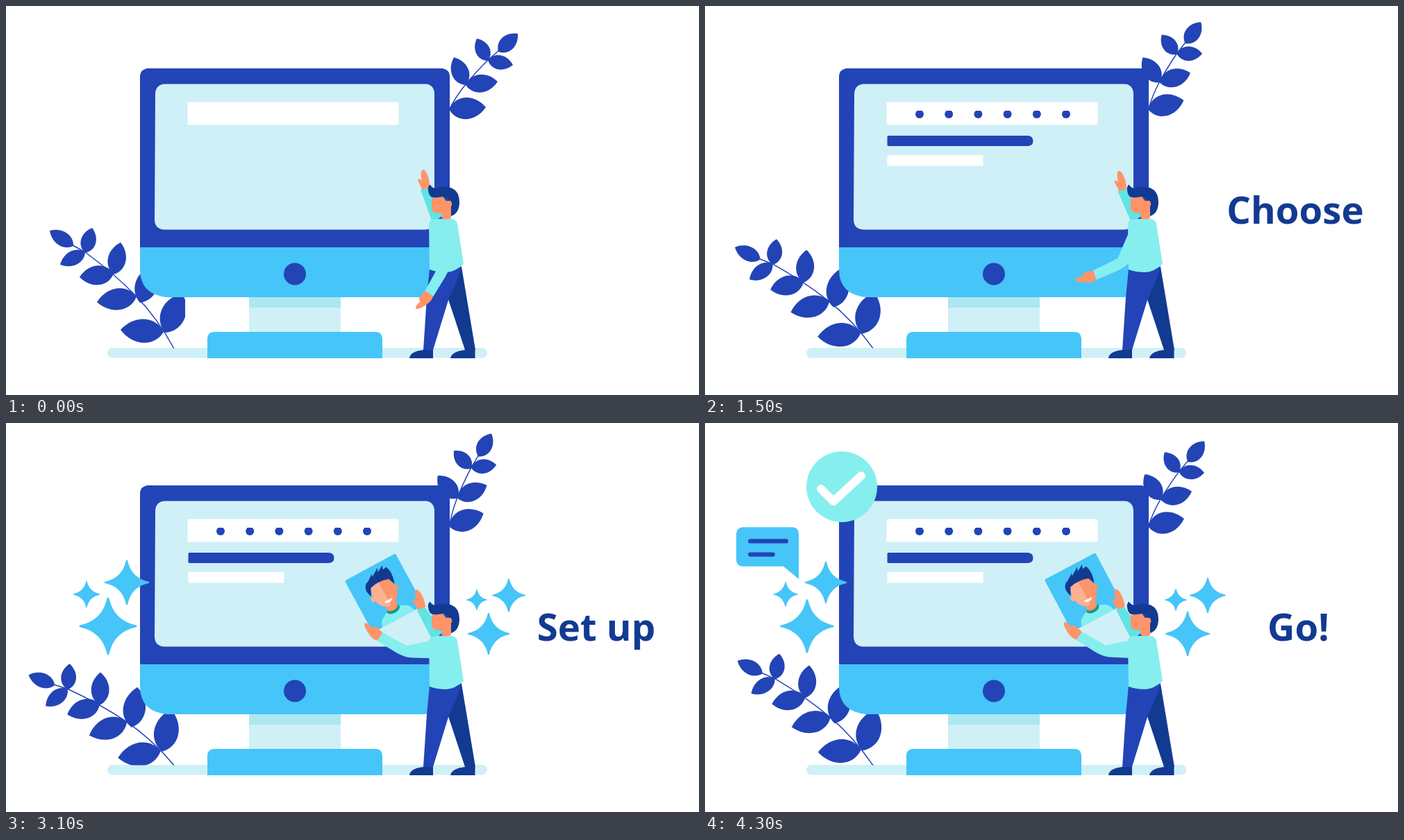
Animation of 998x561 px, one loop 4.4 s. Source, as an HTML page:

```html
<!DOCTYPE html>
<html lang="en">
<head>
<meta charset="utf-8">
<title>Profile setup</title>
<style>
  html, body { margin: 0; width: 100%; height: 100%; overflow: hidden; background: #fff; }
  svg { display: block; width: 100%; height: 100%; }
  .blue { fill: #2344b6; }
  .navy { fill: #123a91; }
  .sky { fill: #46c5f9; }
  .pale { fill: #cff0f7; }
  .mint { fill: #86eeef; }
  .teal { fill: #62e3e4; }
  .skin { fill: #ff9469; }
  .white { fill: #fff; }
  .stem { fill: none; stroke: #2344b6; stroke-width: 1.5; }
  .star { fill: #46c5f9; stroke: #46c5f9; stroke-width: .07; stroke-linejoin: round; }
  .line { fill: none; stroke-linecap: round; stroke-linejoin: round; }
  text { font: 600 54.5px "Noto Sans", "Open Sans", sans-serif; text-anchor: middle; fill: #123a91; }
</style>
</head>
<body>
<svg viewBox="0 0 998 561">
  <defs>
    <clipPath id="dotWipe"><rect id="dotMask" x="300" y="151" height="14"/></clipPath>
    <clipPath id="plantBox"><rect x="0" y="250" width="258" height="243.5"/></clipPath>
  </defs>

  <rect class="pale" x="146" y="493" width="547" height="14.5" rx="7.2"/>
  <g clip-path="url(#plantBox)">
    <g id="leftPlant"><path class="stem" d="M242 494Q218 450 187 418T114 355L96 345"/></g>
  </g>

  <g id="monitor">
    <path class="sky" d="M193 347H639V380Q639 420 600 420H232Q193 416 193 380Z"/>
    <path class="blue" d="M193 348V100Q194 92 203 90H629Q638 92 639 100V348Z"/>
    <path class="pale" d="M215 126Q216 113 229 112.500H604Q616 113 617 126V309Q616 322 603 322.500H228Q215 322 214 309Z"/>
    <circle class="blue" cx="416" cy="386.500" r="16"/>
    <path class="pale" d="M350 420H482V470H350Z"/>
    <path fill="#ade7f0" d="M350 420H482V435H350Z"/>
    <path class="sky" d="M290 508V479Q291 470 300 470H532Q541 470 542 479V508Z"/>
    <rect class="white" x="261.500" y="138.500" width="304" height="33" rx="2"/>
    <g id="dots" class="blue" clip-path="url(#dotWipe)"></g>
    <path id="blueBar" class="blue"/>
    <rect id="whiteBar" class="white" x="262.500" y="215" height="15.500"/>
  </g>

  <g id="rightPlant"><path class="stem" d="M638 150Q648 130 662 113T694 78L710 64"/></g>

  <g id="reach">
    <g id="photo" transform="translate(500 209.300) rotate(-20.700)">
      <rect class="sky" width="83" height="85" rx="2"/>
      <path class="mint" d="M16 85C17 74 29 70 34 69H50C58 70 67 74 68 85Z"/>
      <ellipse cx="42" cy="69.500" rx="10" ry="5.500" fill="#159a8c"/>
      <path class="skin" d="M34 54H50V68Q42 74 34 68Z"/>
      <circle cx="24" cy="43" r="4.200" fill="#ffb08f"/>
      <circle class="skin" cx="60" cy="43" r="4.200"/>
      <path fill="#ffb08f" d="M25 24H42V63C34 63 25 56 25 46Z"/>
      <path class="skin" d="M42 24H59V46C59 56 50 63 42 63Z"/>
      <path class="navy" d="M23 38C17 26 23 18 29 17L39 10L38 14L50 6L48 12L58 6L56 12L62 11C66 20 64 30 61 38L57 28Q42 23 28 27Z"/>
      <path class="white" d="M36 54H49Q46 58 42 58T36 54Z"/>
    </g>
    <path class="teal" d="M597 265L609 262L630 302L614 312Z"/>
    <path class="skin" d="M599 265C597 259 593 253 593.500 250Q595 248 599 252C597 245 597 238 600 236C604 235 607 243 609 250L610.500 262Z"/>
  </g>

  <g id="person">
    <path class="navy" d="M636 392L656 376L676 496H661L635 417Z"/>
    <path class="blue" d="M610 379Q632 388 656 375Q655 385 638 421L615 496H601L606 420Z"/>
    <path class="navy" d="M581 508Q582 498 601 496H615V508ZM640 508Q642 498 661 496L675.500 495V508Z"/>
    <path class="mint" d="M609 313Q610 307 622 307H641Q648 307 650 314L659 372Q646 384 634 384Q620 384 610 380Z"/>
    <path class="navy" d="M608 266C607 262 610 257 611 258Q613 262 618 263C624 261 629 260 634 261C648 262 653 271 653 283C653 294 648 301 641 303L636 277L614 276Q609 274 608 266Z"/>
    <path class="skin" d="M613 277L630 275Q632 280 634 281H641V306Q634 309 627.500 306V298C620 300 613 298 613 290Z"/>
    <circle class="skin" cx="637.500" cy="285.500" r="4.800"/>
  </g>

  <g id="frontArm">
    <path class="mint" d="M545 291L578 315L625 311Q641 314 641 326Q640 338 629 340L584 333Q574 332 562 323L536 302Z"/>
    <path class="skin" d="M546 292L537 302C530 300 526 292 523 284C520 277 522 274 525 275.500C528 277 530 281 532 283C536 279 540 284 546 292Z"/>
  </g>

  <g id="stars"></g>

  <g id="bubble">
    <path class="sky" d="M50 147H126Q135 148 135 156V225L112 206H50Q42 205 41 197V156Q42 148 50 147Z"/>
    <path class="line" stroke="#2344b6" stroke-width="6.500" d="M62 168H116M62 188H96"/>
  </g>
  <g id="check">
    <circle class="mint" cx="197" cy="92" r="51"/>
    <path class="line" stroke="#fff" stroke-width="12" d="M167 95L185 113L225 76"/>
  </g>
  <text id="label" y="314"></text>
</svg>

<script>
const LOOP = 4400, STEP = 100;
const $ = id => document.getElementById(id);

function add(parent, tag, attrs) {
  const el = document.createElementNS('http://www.w3.org/2000/svg', tag);
  for (const name in attrs) el.setAttribute(name, attrs[name]);
  return parent.appendChild(el);
}

// Leaf running from its base to its tip
function leaf(parent, x, y, tipX, tipY, width) {
  const length = Math.hypot(tipX - x, tipY - y);
  const angle = Math.atan2(tipY - y, tipX - x) * 180 / Math.PI;
  const w = width * .69, a = length * .2, b = length * .7;
  add(parent, 'path', {
    class: 'blue',
    transform: `translate(${x} ${y}) rotate(${angle})`,
    d: `M0 0C${a} ${-w} ${b} ${-w} ${length} 0C${b} ${w} ${a} ${w} 0 0Z`
  });
}

[
  [97, 346, 63, 324, 20], [114, 356, 124, 320, 21], [114, 355, 78, 373, 20],
  [155, 387, 165, 341, 25], [155, 386, 106, 391, 27], [193, 428, 213, 373, 31],
  [188, 419, 131, 427, 30], [229, 471, 254, 414, 34], [227, 470, 165, 467, 33]
].forEach(v => leaf($('leftPlant'), ...v));

[
  [638, 149, 691, 146, 30], [662, 114, 645, 74, 24], [662, 114, 708, 109, 25],
  [694, 79, 678, 47, 20], [694, 78, 730, 85, 20], [709, 66, 737, 40, 21]
].forEach(v => leaf($('rightPlant'), ...v));

for (let i = 0; i < 6; i++) add($('dots'), 'circle', { cx: 309 + i * 42.2, cy: 156, r: 6 });

// x, y, radius, time of appearance, phase of the pulse
const stars = [
  [695, 304, 31, 1700, 1], [724, 248.5, 24.7, 1700, 1], [678, 255, 15.3, 1700, 1],
  [147, 293, 41, 2500, -1], [174, 230, 32, 2700, -1], [116, 247, 19, 2800, -1]
].map(([x, y, r, start, phase]) => ({
  x, y, r, start, phase,
  el: add($('stars'), 'path', {
    class: 'star',
    d: 'M0-.96Q.17-.17.96 0Q.17.17 0 .96Q-.17.17-.96 0Q-.17-.17 0-.96Z'
  })
}));

// Text, centre, time of appearance
const labels = [
  ['', 850, 0], ['Fill in', 850, 200], ['Choose', 850, 1300], ['Set up', 850, 2400], ['Go!', 854.5, 3500]
];

function tween(t, keys) {
  const i = keys.findIndex(k => k[0] > t);
  if (i < 0) return keys[keys.length - 1][1];
  if (i === 0) return keys[0][1];
  const [t0, v0] = keys[i - 1], [t1, v1] = keys[i];
  return v0 + (v1 - v0) * (t - t0) / (t1 - t0);
}

const reachAngle = [[0, 0], [800, -9], [900, -9.3], [1500, -3.6], [1800, -1], [2000, -1.2],
  [2600, -3.7], [3500, -11.1], [3700, -11.4], [4300, -7.1]];
const liftAngle = [[1300, -97.5], [1400, -82], [1500, -62], [1800, 0]];

const rotate = (id, angle, x, y) => $(id).setAttribute('transform', `rotate(${angle} ${x} ${y})`);
const scale = (el, s, x, y) => el.setAttribute('transform', `translate(${x} ${y}) scale(${s}) translate(${-x} ${-y})`);
const show = (el, on) => el.setAttribute('visibility', on ? 'visible' : 'hidden');

function render(t) {
  const sway = Math.min(t, 5500 - t) / 1000;
  rotate('leftPlant', -4.85 * sway, 241, 493);
  rotate('rightPlant', -7.4 * sway, 639, 149);

  const reach = tween(t, reachAngle);
  rotate('reach', reach, 628, 308);
  rotate('frontArm', t < 1800 ? tween(t, liftAngle) : (reach + 1.2) * 1.1, 627, 326);
  show($('photo'), t >= 1800);

  $('dotMask').setAttribute('width', tween(t, [[0, 0], [500, 230]]));
  const end = tween(t, [[500, 262.5], [800, 425.5], [900, 472.5]]);
  $('blueBar').setAttribute('d', end < 263 ? '' : end < 472
    ? `M264 187H${end}L${end - 1} 202H264Q262.500 202 262.500 200V189Q262.500 187 264 187Z`
    : 'M264 187H465Q472.500 187.500 472.500 194.500T465 202H264Q262.500 202 262.500 200V189Q262.500 187 264 187Z');
  $('whiteBar').setAttribute('width', tween(t, [[700, 0], [800, 28], [1100, 138]]));

  const pulse = Math.cos((t - 2700) / 1400 * 2 * Math.PI);
  for (const s of stars) {
    const pop = tween(t - s.start, [[-100, 0], [0, .35], [100, .68], [200, 1]]);
    const size = s.r * pop * (1 + .077 * s.phase * pulse);
    show(s.el, pop > 0);
    s.el.setAttribute('transform', `translate(${s.x} ${s.y}) scale(${size})`);
  }

  show($('bubble'), t >= 3300);
  scale($('bubble'), tween(t, [[3300, .4], [3500, 1], [3600, 1.06], [4300, .957]]), 135, 225);
  show($('check'), t >= 3800);
  scale($('check'), tween(t, [[3800, .4], [3900, .8], [4000, 1.15], [4100, 1]]), 197, 92);

  const [text, x, start] = labels.filter(l => l[2] <= t).pop();
  const label = $('label');
  label.textContent = text;
  label.setAttribute('x', x);
  scale(label, tween(t - start, [[0, .736], [100, 1.18], [200, 1]]), x, 295);
}

function tick() {
  render(Math.floor(performance.now() % LOOP / STEP) * STEP);
  requestAnimationFrame(tick);
}
tick();
</script>
</body>
</html>
```
